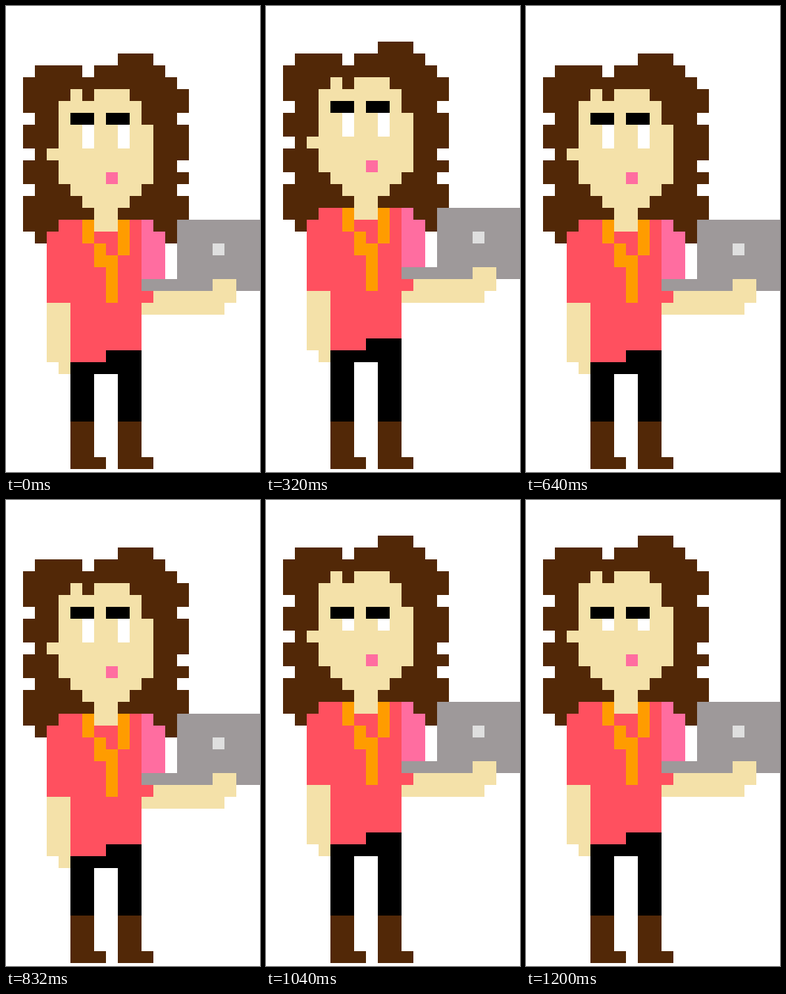
An HTML page that plays this animation: 343x628 px, repeating every 1280 ms.

```html
<!DOCTYPE html>
<html lang="en">
<head>
<meta charset="utf-8">
<title>Woman with laptop</title>
<style>
  html, body { margin: 0; width: 100%; height: 100%; overflow: hidden; background: #fff; }
  svg { display: block; width: 343px; height: 628px; }
</style>
</head>
<body>
<svg viewBox="0 0 343 628" shape-rendering="crispEdges">
  <!-- one unit is one 16px cell -->
  <g transform="translate(7 0) scale(16)">
    <g id="legs">
      <path d="M5 30H7V35H5ZM9 30H11V35H9Z"/>
      <path fill="#522807" d="M5 35H7V38H8V39H5ZM9 35H11V38H12V39H9Z"/>
    </g>
    <g id="body">
      <path id="hair" fill="#522807" d="M9 4H12V5H13V6H14V7H15V9H14V10H15V13H14V14H15V15H14V16H15V18H14V20H13V19H12V18H4V19H3V20H2V19H1V16H2V15H1V13H2V12H1V10H2V9H1V6H2V5H6V6H7V5H9Z"/>
      <path id="shirt" fill="#ff505f" d="M4 18H11V24H12V25H11V29H8V30H5V25H3V19H4Z"/>
      <path id="sleeve" fill="#ff6da0" d="M11 18H12V19H13V23H11Z"/>
      <path id="waist" d="M8 29H11V31H5V30H8Z"/>
      <path id="lanyard" fill="#ff9c00" d="M6 18H7V20H6ZM9 18H10V21H9ZM7 20H8V21H9V25H8V22H7Z"/>
      <path id="laptop" fill="#9e999a" d="M14 18H21V24H11V23H14Z"/>
      <path id="badge" fill="#dfdfdf" d="M17 20H18V21H17Z"/>
      <g id="skin" fill="#f4e1a9">
        <path d="M5 7H6V8H7V7H10V8H11V10H12V15H11V16H10V17H9V19H7V17H6V16H5V15H4V13H3V12H4V8H5Z"/>
        <path d="M3 25H5V31H4V30H3Z"/>
        <path d="M17 23H19V25H18V26H11V25H12V24H17Z"/>
      </g>
      <path id="mouth" fill="#ff6da0" d="M8 14H9V15H8Z"/>
      <path id="eyes" fill="#fff"/>
      <path id="lids"/>
    </g>
  </g>
</svg>
<script>
  const LOOP = 1280, BEAT = 320, BLINK_START = 960, BLINK_STEP = 80;
  const $ = id => document.getElementById(id);
  const body = $('body'), eyes = $('eyes'), lids = $('lids');

  // How many cells the lids drop: 0, 1, 2, 1
  function lidDrop(t) {
    if (t < BLINK_START) return 0;
    return 2 - Math.abs(2 - Math.floor((t - BLINK_START) / BLINK_STEP));
  }

  function draw(time) {
    const t = time % LOOP;
    const lift = Math.floor(t / BEAT) % 2;
    const drop = lidDrop(t);
    body.setAttribute('transform', `translate(0 ${-lift})`);
    lids.setAttribute('d', `M5 ${9 + drop}h2v1h-2zM8 ${9 + drop}h2v1h-2z`);
    eyes.setAttribute('d', drop < 2 ? `M6 ${10 + drop}h1V12h-1zM9 ${10 + drop}h1V12h-1z` : '');
  }

  const start = performance.now();
  function tick() {
    draw(performance.now() - start);
    requestAnimationFrame(tick);
  }
  tick();
</script>
</body>
</html>
```
